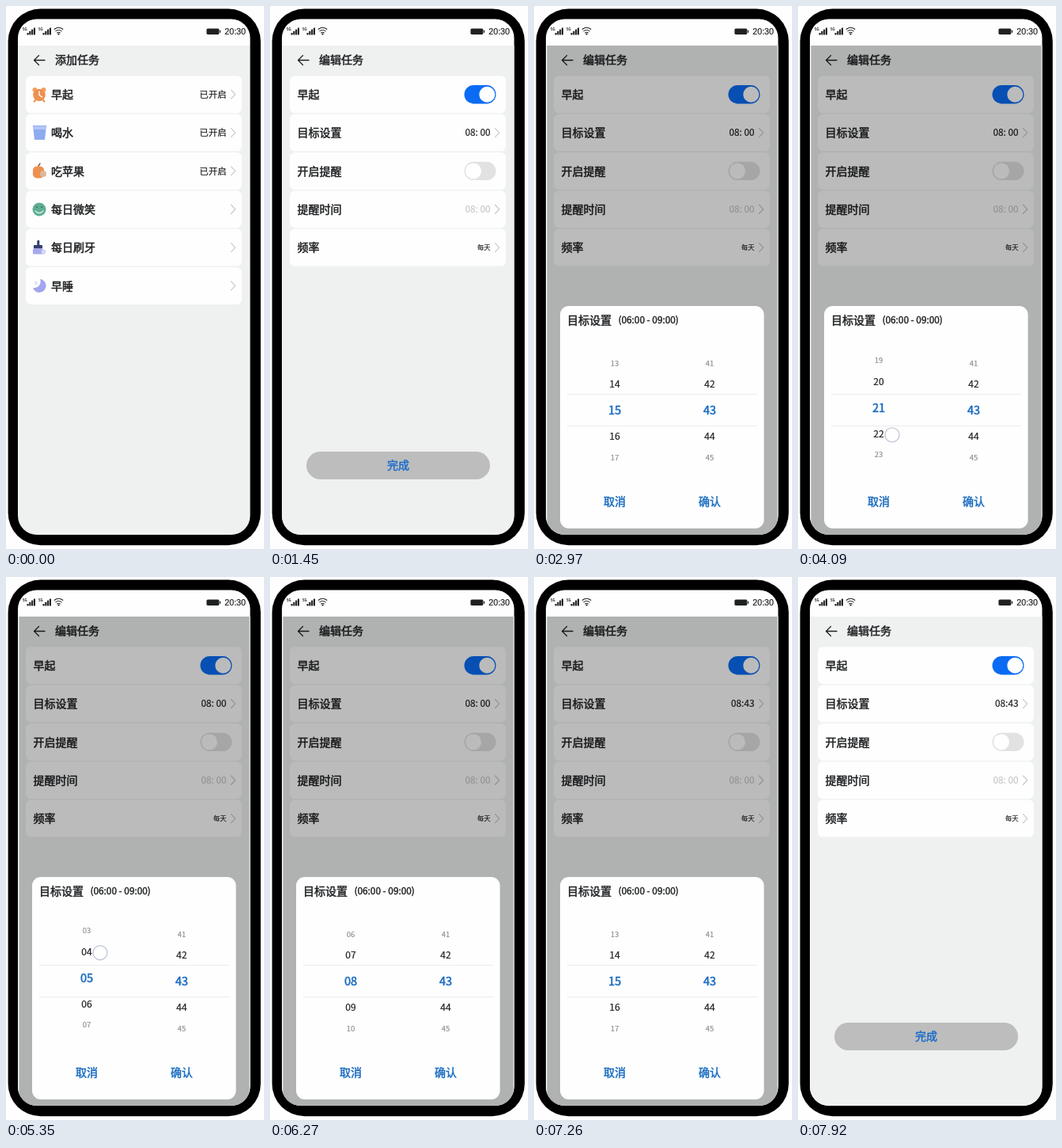
An HTML page that plays this animation: 326 px wide and 686 px high, repeating every 7990 ms.

```html
<!DOCTYPE html>
<html lang="zh-CN">
<head>
<meta charset="utf-8">
<style>
  html, body { margin: 0; width: 100%; height: 100%; overflow: hidden; background: #fefefe; }
  svg { display: block; }
  text { font-family: "Noto Sans CJK SC", "Noto Sans CJK", "Noto Sans", sans-serif; stroke-linejoin: round; }
  .status { font-family: "Liberation Sans", sans-serif; }
</style>
</head>
<body>
<svg id="stage" width="326" height="686" viewBox="0 0 326 686"></svg>
<script>
const LOOP = 7990;
const INK = '#1f2123', BLUE = '#1a6cc0';
const WHEEL_Y = 511, SLOT_OFFSETS = [-60, -33.5, 0, 33, 59];
const SLOT_SIZES = [9.5, 12, 14.6, 12, 9.5];
const SLOT_COLORS = ['#8c8c8c', INK, BLUE, INK, '#8c8c8c'];
const MEDIUM = 0.035, LIGHT = 0.018;

// Text is placed by its vertical middle; a thin outline gives weights between regular and bold.
const label = (x, y, text, { size = 14, color = INK, heft = MEDIUM, anchor = 'start', attrs = '' } = {}) =>
  `<text x="${x}" y="${y + size * 0.37}" font-size="${size}" fill="${color}" stroke="${color}" stroke-width="${size * heft}" text-anchor="${anchor}" ${attrs}>${text}</text>`;
const rect = (x, y, w, h, r, fill, attrs = '') =>
  `<rect x="${x}" y="${y}" width="${w}" height="${h}" rx="${r}" fill="${fill}" ${attrs}/>`;
const circle = (x, y, r, fill) => `<circle cx="${x}" cy="${y}" r="${r}" fill="${fill}"/>`;
const line = (d, color, width) =>
  `<path d="${d}" fill="none" stroke="${color}" stroke-width="${width}" stroke-linecap="round" stroke-linejoin="round"/>`;

const rowY = i => 111.7 + i * 48.35;
const card = i => rect(25, rowY(i) - 23.5, 273, 47, 6.5, '#fefefe');
const chevron = y => line(`M284.5 ${y - 5.5}l5.2 5.5l-5.2 5.5`, '#c8c8c8', 1.2);
const toggle = (y, on) =>
  rect(245.5, y - 11.7, 40, 23.4, 11.7, on ? '#0a6cf4' : '#e2e2e2') + circle(on ? 274.3 : 257, y, 10, '#fff');

const icons = [
  circle(36.5, 106, 3, '#f0a060') + circle(47.5, 106, 3, '#f0a060') + circle(42, 112.5, 7.8, '#ee9050') +
    line('M42 108v4.5l3.5 2.5', '#fff', 1.4) + line('M37 119l-1.5 1.8M47 119l1.5 1.8', '#ee9050', 2),
  '<path d="M34 151h17l-2 18h-13z" fill="#8eaaf0"/><path d="M34.3 152h16.4l-.4 4h-15.6z" fill="#b3c7f6"/>',
  rect(34, 202.5, 14, 15, 5, '#ee9050') + line('M41 202l2-3', '#8a5a3c', 1.5) + circle(47, 212, 4, '#ddb89c'),
  circle(42, 257, 8.5, '#5fae94') + line('M37 259q5 5 10 0', '#d9eee6', 1.3) +
    circle(39, 254, 1, '#2f7562') + circle(45, 254, 1, '#2f7562'),
  rect(39.3, 296, 3, 7, 1, '#343f70') + rect(35, 302, 11, 4.5, 1, '#343f70') +
    rect(34, 306.5, 13, 7, 1, '#a6a9ee') + circle(47.5, 310.5, 3, '#d5d6f6'),
  '<path d="M43 345a8.5 8.5 0 1 1-9 11a8 8 0 0 0 9-11z" fill="#a3a5ee"/>' + circle(38, 350, 2.2, '#e1e2fa')
];

const header = title =>
  rect(15, 50, 294, 620, 0, '#eff1f1') +
  line('M49 68.5H35.5M41.5 62.5l-6 6l6 6', INK, 1.3) + label(62, 68, title);

const listPage = header('添加任务') +
  ['早起', '喝水', '吃苹果', '每日微笑', '每日刷牙', '早睡'].map((name, i) =>
    card(i) + icons[i] + label(57, rowY(i), name) + chevron(rowY(i)) +
    (i < 3 ? label(278.5, rowY(i), '已开启', { size: 11.3, anchor: 'end', heft: LIGHT }) : '')).join('');

const value = (i, text, size, color, attrs) =>
  label(278.5, rowY(i), text, { size, color, anchor: 'end', heft: LIGHT, attrs }) + chevron(rowY(i));

const editPage = header('编辑任务') +
  ['早起', '目标设置', '开启提醒', '提醒时间', '频率'].map((name, i) =>
    card(i) + label(34.5, rowY(i), name)).join('') +
  toggle(rowY(0), true) + value(1, '08: 00', 11.8, INK, 'id="goal"') + toggle(rowY(2), false) +
  value(3, '08: 00', 11.8, '#c9c9c9') + value(4, '每天', 8.3, INK) +
  rect(46, 563, 232, 35, 17.5, '#bdbdbd') +
  label(162, 580, '完成', { color: '#1c6dcc', anchor: 'middle' });

const slots = side => SLOT_OFFSETS.map((dy, i) =>
  label(side ? 222 : 102, WHEEL_Y + dy, 41 + i, {
    size: SLOT_SIZES[i], color: SLOT_COLORS[i], anchor: 'middle', heft: i === 2 ? MEDIUM : LIGHT
  })).join('');

const dialog = rect(33, 379, 257.6, 281, 11, '#fefefe') +
  label(42, 397, '目标设置') + label(106.5, 397, '(06:00 - 09:00)', { size: 11.8, heft: MEDIUM }) +
  line('M42 490.5H282M42 530.5H282', '#ececec', 1) +
  `<g id="hours">${slots(0)}</g>${slots(1)}` +
  label(102, 626, '取消', { color: BLUE, anchor: 'middle' }) +
  label(222, 626, '确认', { color: BLUE, anchor: 'middle' });

const signal = x => label(x, 29.5, '5G', { size: 4.5 }) +
  [0, 1, 2, 3].map(i => rect(x + 5.5 + i * 2.8, 34 - i * 2.2, 2.1, 2.5 + i * 2.2, 0.4, INK)).join('');
const statusBar = rect(15, 16, 294, 34, 0, '#fefefe') + signal(21) + signal(41) +
  line('M61.2 29.3q5.3-4 10.6 0M62.9 31.6q3.6-2.8 7.2 0M64.6 33.9q1.9-1.4 3.8 0', INK, 1.1) +
  circle(66.5, 35.6, 1.1, INK) +
  rect(253.4, 28.5, 16, 7.4, 1.6, INK) + rect(270, 30.6, 1.2, 3.2, 0.5, INK) +
  label(303, 31.6, '20:30', { size: 10.7, anchor: 'end', heft: LIGHT, attrs: 'class="status"' });

document.getElementById('stage').innerHTML = `
  <clipPath id="screen">${rect(15, 16.5, 293.5, 651.5, 24, '#000')}</clipPath>
  ${rect(2.6, 3.6, 319.2, 677.6, 41, '#000')}
  <g clip-path="url(#screen)">
    ${listPage}
    <g id="edit">${editPage}</g>
    ${rect(16.5, 50, 291, 620, 0, '#000', 'id="dim"')}
    <g id="dialog">${dialog}</g>
    ${statusBar}
    <circle id="touch" r="9" fill="#fff" fill-opacity=".6" stroke="#c3cad8" stroke-width="1.4"/>
  </g>`;

const el = Object.fromEntries(['edit', 'goal', 'dim', 'dialog', 'hours', 'touch']
  .map(id => [id, document.getElementById(id)]));

const progress = (t, start, end) => Math.min(1, Math.max(0, (t - start) / (end - start)));
const smooth = u => u * u * (3 - 2 * u);
const easeOut = u => 1 - (1 - u) ** 3;

const FINGER_X = 119, FINGER_START = 545, ROW = 33, SWIPE_MS = 483;
const swipes = [3, 3, 3, 3, 3, 2].map((rows, i) => ({ start: 3040 + i * 500, rows }));
const taps = [
  { start: 480, end: 680, x: 160, y: 113 },
  { start: 1530, end: 1730, x: 222, y: 161 },
  { start: 6880, end: 7180, x: 224.5, y: 632.5 }
];
const CONFIRMED = 7060;

function showTouch(t) {
  const tap = taps.find(p => t >= p.start && t < p.end);
  const swipe = swipes.find(s => t >= s.start && t < s.start + SWIPE_MS);
  let x = -50, y = -50, opacity = 1;
  if (tap) {
    ({ x, y } = tap);
    opacity = Math.min(progress(t, tap.start, tap.start + 60), 1 - progress(t, tap.end - 80, tap.end));
  } else if (swipe) {
    x = FINGER_X;
    y = FINGER_START - ROW * swipe.rows * smooth(progress(t, swipe.start, swipe.start + SWIPE_MS));
  }
  el.touch.setAttribute('transform', `translate(${x} ${y})`);
  el.touch.setAttribute('opacity', opacity);
}

function showHours(t) {
  const turned = t < CONFIRMED
    ? swipes.reduce((sum, s) => sum + s.rows * smooth(progress(t, s.start, s.start + SWIPE_MS)), 0)
    : 0;
  const nearest = Math.round(turned);
  el.hours.setAttribute('transform', `translate(0 ${(nearest - turned) * ROW})`);
  [...el.hours.children].forEach((slot, i) => {
    slot.textContent = String((15 + nearest + i - 2) % 24).padStart(2, '0');
  });
}

function render(t) {
  const pageShift = 294 * (1 - easeOut(progress(t, 740, 1100)));
  const opened = easeOut(progress(t, 1720, 2020)) - smooth(progress(t, 7300, 7560));
  const dimmed = progress(t, 1800, 2330) - progress(t, 7300, 7600);
  el.edit.setAttribute('transform', `translate(${pageShift} 0)`);
  el.dialog.setAttribute('transform', `translate(0 ${300 * (1 - opened)})`);
  el.dim.setAttribute('opacity', 0.265 * dimmed);
  el.goal.textContent = t < CONFIRMED ? '08: 00' : '08:43';
  showHours(t);
  showTouch(t);
}

const began = performance.now();
function frame() {
  render((performance.now() - began) % LOOP);
  requestAnimationFrame(frame);
}
frame();
</script>
</body>
</html>
```
